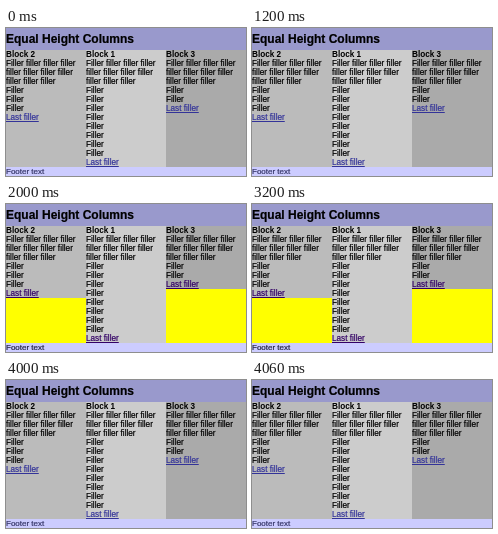
These frames come from a looping animation (240 px wide and 148 px high, 4.1 s). An HTML page:

```html
<!DOCTYPE html>
<html lang="en">
<head>
<meta charset="utf-8">
<title>Equal Height Columns</title>
<style>
html, body { margin: 0; width: 100%; height: 100%; overflow: hidden; }
#stage {
  position: relative; width: 240px; height: 148px; overflow: hidden;
  font: 8.2px/9px "Liberation Sans", Arial, sans-serif; color: #000; background: #ccf;
  -webkit-text-stroke: 0.2px;
}
h1 { margin: 0; height: 22px; font-size: 12px; line-height: 23px; background: #99c; white-space: nowrap; }
#columns { display: flex; height: 117px; align-items: stretch; }
.uneven #columns { align-items: flex-start; background: #ff0; }
.column { width: 80px; }
.column div, footer { height: 9px; white-space: nowrap; }
.heading { font-weight: bold; -webkit-text-stroke: 0; }
.link { color: #339; text-decoration: underline; }
.uneven .link { color: #306; }
footer { font-size: 8px; color: #336; }
.uneven footer { color: #224; }
</style>
</head>
<body>
<div id="stage">
  <h1>Equal Height Columns</h1>
  <div id="columns"></div>
  <footer>Footer text</footer>
</div>
<script>
const stage = document.getElementById("stage");
const columns = document.getElementById("columns");

function addLine(column, text, className = "") {
  const line = document.createElement("div");
  const span = document.createElement("span");
  span.textContent = text;
  span.className = className;
  line.append(span);
  column.append(line);
}

function addColumn(title, color, fillerCount) {
  const column = document.createElement("div");
  column.className = "column";
  column.style.background = color;
  addLine(column, title, "heading");
  addLine(column, "Filler filler filler filler");
  addLine(column, "filler filler filler filler");
  addLine(column, "filler filler filler");
  for (let i = 0; i < fillerCount; i++) addLine(column, "Filler");
  addLine(column, "Last filler", "link");
  columns.append(column);
}

addColumn("Block 2", "#bbb", 3);
addColumn("Block 1", "#ccc", 8);
addColumn("Block 3", "#aaa", 2);

function draw() {
  const time = performance.now() % 4100;
  stage.classList.toggle("uneven", time >= 2000 && time < 4000);
  requestAnimationFrame(draw);
}
draw();
</script>
</body>
</html>
```
